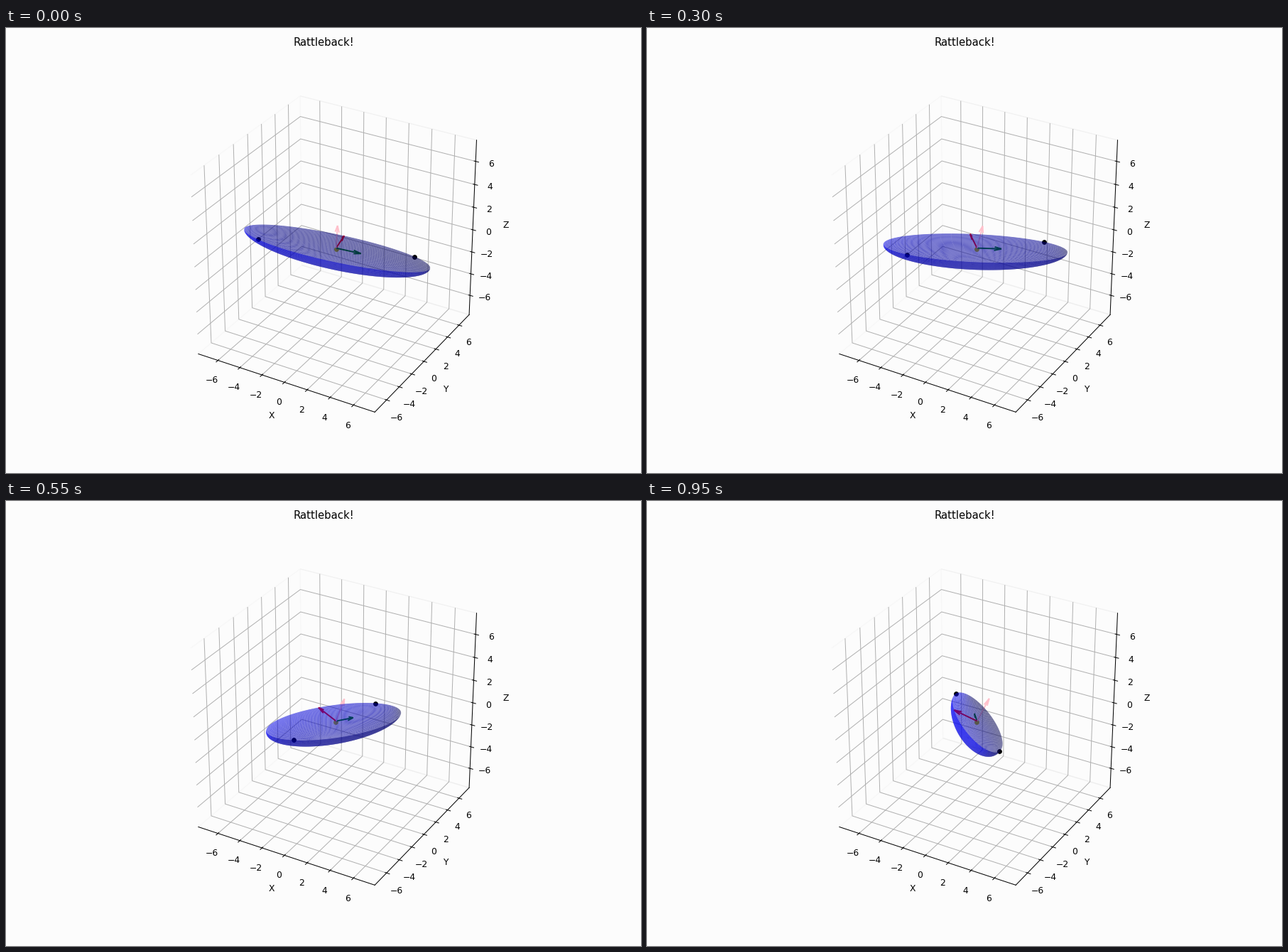
A matplotlib script for the animation above (1 s loop, 894 by 626 pixels).

```python
import numpy as np
import matplotlib.pyplot as plt
from matplotlib.animation import FuncAnimation

FRAMES, INTERVAL = 20, 50
SEMI_AXES = np.array([7.5, 2.0, 1.5])
MASS = np.array([5.95, 1.2, 0.0])
ARROW_LENGTH = 2
LIMIT = 7.5

plt.rcParams["axes3d.automargin"] = True

fig = plt.figure(figsize=(10, 7.00224), dpi=89.4, facecolor="#fcfcfc")
fig.suptitle("Rattleback!")
ax = fig.add_subplot(projection="3d", facecolor="none")
ax.set_box_aspect((1, 1, 1))
ax.set_xlim(-LIMIT, LIMIT)
ax.set_ylim(-LIMIT, LIMIT)
ax.set_zlim(-LIMIT, LIMIT)
ax.set_xlabel("X")
ax.set_ylabel("Y")
ax.set_zlabel("Z")
for axis in (ax.xaxis, ax.yaxis, ax.zaxis):
    axis.pane.set_fill(False)

# Lower half of an ellipsoid in body coordinates
u = np.linspace(0, 2 * np.pi, 100)
v = np.linspace(np.pi / 2, np.pi, 100)
hull = np.stack([
    SEMI_AXES[0] * np.outer(np.cos(u), np.sin(v)),
    SEMI_AXES[1] * np.outer(np.sin(u), np.sin(v)),
    SEMI_AXES[2] * np.outer(np.ones_like(u), np.cos(v)),
])


def body_axes(i):
    """Unit body axes as columns: steady spin with growing pitch and roll."""
    yaw = np.radians(11.7 + 5.75 * i + 0.014 * i**2)
    pitch = np.arcsin(-0.06 - 0.0295 * i + 0.00108 * i**2)
    roll = np.arcsin((0.0075 * i + 0.00092 * i**2) / np.cos(pitch))
    e1 = np.array([np.cos(pitch) * np.cos(yaw),
                   np.cos(pitch) * np.sin(yaw),
                   np.sin(pitch)])
    side = np.array([-np.sin(yaw), np.cos(yaw), 0.0])
    e2 = np.cos(roll) * side + np.sin(roll) * np.cross(e1, side)
    return np.column_stack([e1, e2, np.cross(e1, e2)])


artists = []


def draw(i):
    while artists:
        artists.pop().remove()
    rotation = body_axes(i)
    x, y, z = np.tensordot(rotation, hull, axes=1)
    artists.append(ax.plot_surface(x, y, z, color="b", alpha=0.6))
    for direction, color in zip(rotation.T, ("g", "r", "pink")):
        artists.append(ax.quiver(0, 0, 0, *(ARROW_LENGTH * direction), color=color))
    for point, color in ((MASS, "k"), (-MASS, "k"), (np.array([0, 0, -0.1]), "y")):
        px, py, pz = rotation @ point
        artists.append(ax.scatter([px], [py], [pz], color=color))
    return artists


anim = FuncAnimation(fig, draw, frames=FRAMES, interval=INTERVAL,
                     repeat=True, repeat_delay=0, blit=False)
plt.show()
```
